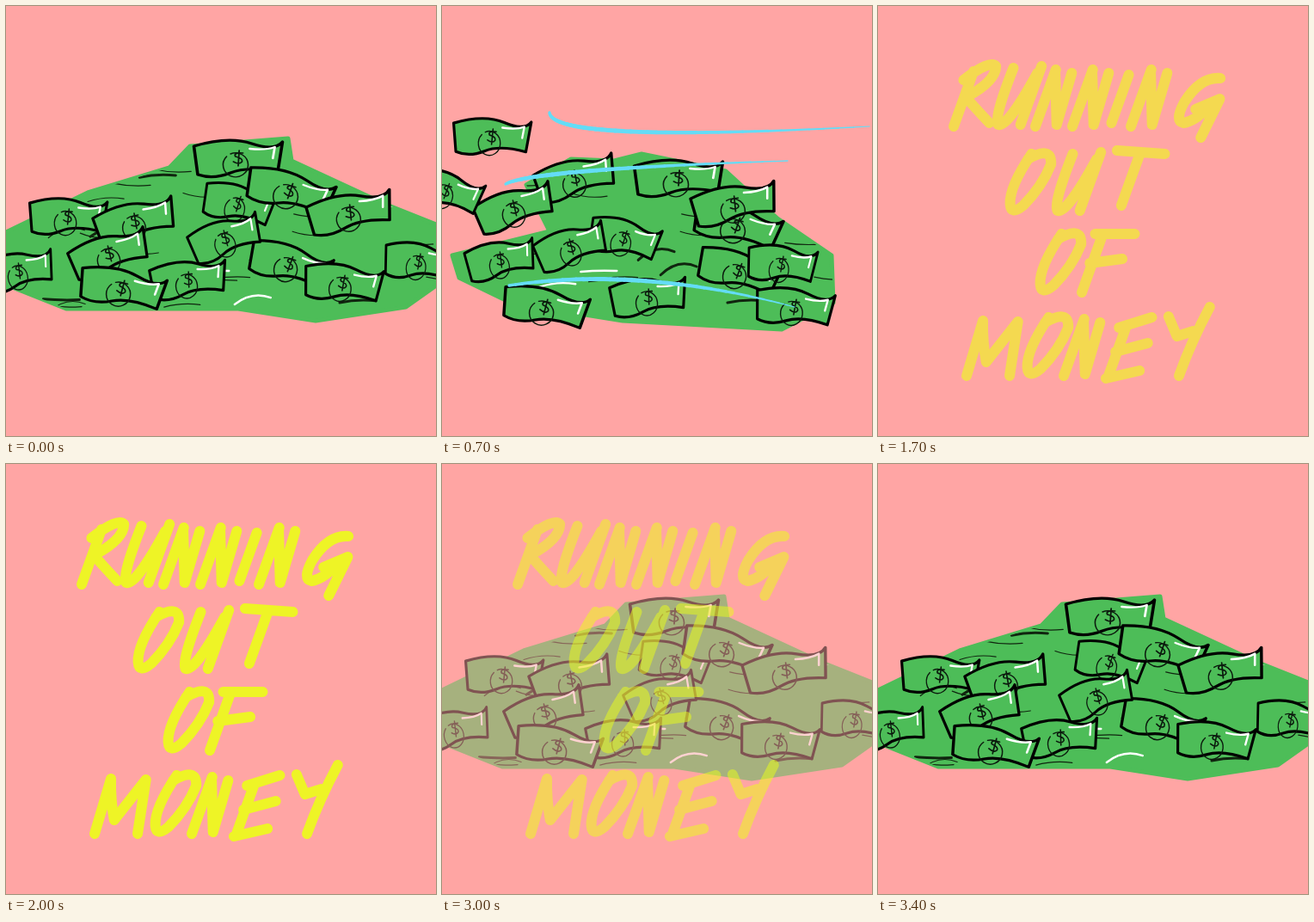
Write an HTML page with a canvas that moves like this. It is 500 px wide and 500 px high and loops after 3500 ms.

```html
<!DOCTYPE html>
<html lang="en">
<head>
<meta charset="utf-8">
<title>Running out of money</title>
<style>
html, body { margin: 0; height: 100%; overflow: hidden; background: #ffa5a4; }
canvas { display: block; width: 100vw; height: 100vh; }
</style>
</head>
<body>
<canvas width="500" height="500" role="img" aria-label="Running out of money"></canvas>
<script>
const SIZE = 500, STEP = 100, STEPS = 35;
const PINK = '#ffa5a4', GREEN = '#4dbd58', YELLOW = '#ecff14', CYAN = '#64dcf6';
const ctx = document.querySelector('canvas').getContext('2d');

// Three poses each: resting pile, gust, remains. Flat lists of x, y.
const POSE_STEPS = [0, 7, 11];
const heap = [
  [-10,268, 95,217, 190,188, 214,163, 328,154, 332,180, 440,230, 510,258, 510,318, 465,350, 360,366, 270,352, 70,352, -10,320],
  [12,290, 125,262, 98,208, 150,178, 200,180, 232,172, 330,192, 390,247, 453,290, 455,345, 395,376, 210,366, 80,345, 20,316],
  [-10,222, 60,212, 200,182, 250,192, 300,235, 340,272, 385,320, 456,332, 430,366, 360,362, 200,367, 60,360, 85,316, -10,312]
];
const bills = [
  [270,177, 270,230, 330,215, 72,245, 150,250, 120,288, 212,318, 135,328, 330,300, 392,322, 15,308, 255,270, 400,240, 480,297, -60,215],
  [275,200, 212,270, 343,255, 58,152, 155,200, 84,235, 240,338, 120,350, 345,308, 410,350, 68,295, 150,280, 340,230, 395,300, 5,215],
  [225,165, 205,215, 305,258, -60,165, 150,140, 85,190, 140,340, 40,285, 315,297, 408,348, 5,240, 150,275, 245,265, 345,290, -60,290]
];
// Each wind line: start, control point, end
const wind = [
  [125,124, 128,160, 497,140, 74,207, 105,190, 402,180, 78,325, 230,302, 410,350],
  [125,124, 128,160, 497,140, 74,207, 105,190, 402,180, 78,325, 230,302, 410,350],
  [45,149, 160,138, 395,146, 38,223, 150,230, 335,210, 115,291, 350,232, 490,262]
];

// Upright letters, 70 units tall
const glyphs = {
  R: 'M0 6V70M-8 16Q14-8 24 0Q30 18 2 36Q14 46 40 66',
  U: 'M-4 2Q-6 60 2 68Q14 72 26 8M28 0V68',
  N: 'M0 4V70M0 6L24 68 20 8',
  I: 'M-4 10V66',
  G: 'M30 14Q6 12-2 42Q-6 64 6 66Q18 64 28 48M14 50L38 38 32 83',
  O: 'M4 2Q-8 40 0 60Q6 74 16 62Q30 40 31 14Q24-8 2 8',
  T: 'M-24-2L33 2M4 4V62',
  F: 'M-6 2H40M3 4V70M0 36L36 31',
  M: 'M-4 6L0 70M-4 6Q4 30 17 54L37 7 50 70',
  E: 'M-6 14L28 2M2 12V70M0 42L34 32M0 73L36 64',
  Y: 'M-35 1L-17 24 0 18M9-10Q2 30 2 70'
};
const lines = [
  ['RUNNING', 70, [88, 137, 183, 226, 274, 294, 348]],
  ['OUT', 170, [150, 206, 276]],
  ['OF', 263, [185, 234]],
  ['MONEY', 360, [103, 170, 216, 266, 348]]
];
const SLANT = 0.36;
const lettering = new Path2D();
for (const [word, y, xs] of lines) {
  xs.forEach((x, i) => lettering.addPath(
    new Path2D(glyphs[word[i]]),
    new DOMMatrix([1, 0, -SLANT, 1, x + 70 * SLANT, y])
  ));
}

const BILL = new Path2D('M-46-14Q-10-26 14-17T46-19L41 16Q10 9-8 17T-42 19Z');
const COIN = new Path2D('M-8-5A13 14 0 1 1-12-2');
const SIGN = new Path2D('M5-6Q-5-7-3-2Q5 0 4 4Q1 8-5 4M1-9L0 9');
const SHINE = new Path2D('M12-11Q28-9 38-13L36 0');

const clamp = v => Math.min(1, Math.max(0, v));
const random = n => {
  const v = Math.sin(n * 12.9898) * 43758.5453;
  return v - Math.floor(v);
};

function tween(poses, s) {
  const k = s < POSE_STEPS[1] ? 0 : 1;
  const u = clamp((s - POSE_STEPS[k]) / (POSE_STEPS[k + 1] - POSE_STEPS[k]));
  return poses[k].map((v, i) => v + (poses[k + 1][i] - v) * u);
}

function stroke(path, color, width) {
  ctx.strokeStyle = color;
  ctx.lineWidth = width;
  ctx.stroke(path);
}

function drawBill(x, y, i) {
  ctx.save();
  ctx.translate(x, y);
  ctx.rotate(0.3 * Math.sin(i));
  ctx.scale(1.12 - 0.25 * random(i), 1);
  ctx.fillStyle = GREEN;
  ctx.fill(BILL);
  stroke(BILL, '#000', 3.2);
  stroke(COIN, '#0b1a0d', 1.4);
  stroke(SIGN, '#0b1a0d', 1.6);
  stroke(SHINE, '#fff', 2.4);
  ctx.restore();
}

// Loose creases scattered over the heap, carried along to the left
function drawCreases(outline, s) {
  ctx.save();
  ctx.clip(outline);
  for (let i = 0; i < 34; i++) {
    const x = 560 * random(i + 50) - 8 * s, y = 180 + 180 * random(i + 90);
    const bend = 30 * random(i + 130) - 20;
    const crease = new Path2D(`M${x} ${y}q20 ${bend} 42 ${bend / 2}`);
    if (i % 6) stroke(crease, '#10250f', i % 3 ? 1.2 : 3);
    else stroke(crease, '#fff', 2.4);
  }
  ctx.restore();
}

// Tapered stroke along a quadratic curve, growing as the gust picks up
function drawWind(p, growth) {
  const n = 40;
  const at = (u, k) => (1 - u) ** 2 * p[k] + 2 * u * (1 - u) * p[k + 2] + u * u * p[k + 4];
  ctx.strokeStyle = CYAN;
  for (let i = 0; i < n * growth; i++) {
    ctx.lineWidth = 1 + 4 * Math.sin(Math.PI * (0.2 + 0.8 * i / n));
    ctx.beginPath();
    for (const u of [i / n, (i + 1) / n]) ctx.lineTo(at(u, 0), at(u, 1));
    ctx.stroke();
  }
}

function drawMoney(s, alpha) {
  const outline = new Path2D(`M${tween(heap, s).join(' ')}Z`);
  ctx.fillStyle = GREEN;
  ctx.fill(outline);
  stroke(outline, GREEN, 5);
  drawCreases(outline, s);
  const spots = tween(bills, s);
  for (let i = 0; i < spots.length; i += 2) drawBill(spots[i], spots[i + 1], i / 2);
  const gusts = tween(wind, s);
  for (let i = 0; i < gusts.length; i += 6) drawWind(gusts.slice(i, i + 6), clamp(s / 7));
  fillPink(1 - alpha);
}

function drawText(alpha) {
  ctx.globalAlpha = alpha;
  stroke(lettering, YELLOW, 12);
  ctx.globalAlpha = 1;
}

function fillPink(alpha) {
  ctx.globalAlpha = alpha;
  ctx.fillStyle = PINK;
  ctx.fillRect(0, 0, SIZE, SIZE);
  ctx.globalAlpha = 1;
}

function draw(s) {
  fillPink(1);
  if (s < 12) {
    drawMoney(s, clamp((12 - s) / 2));
  } else if (s < 27) {
    drawText(1 - (1 - clamp((s - 14) / 12)) ** 3);
  } else {
    const fade = (s - 26) / 8;
    drawMoney(0, fade);
    drawText(1 - fade);
  }
}

ctx.lineCap = ctx.lineJoin = 'round';
const start = performance.now();
let shown = -1;
function tick() {
  const s = Math.floor((performance.now() - start) / STEP) % STEPS;
  if (s !== shown) draw(shown = s);
  requestAnimationFrame(tick);
}
tick();
</script>
</body>
</html>
```
